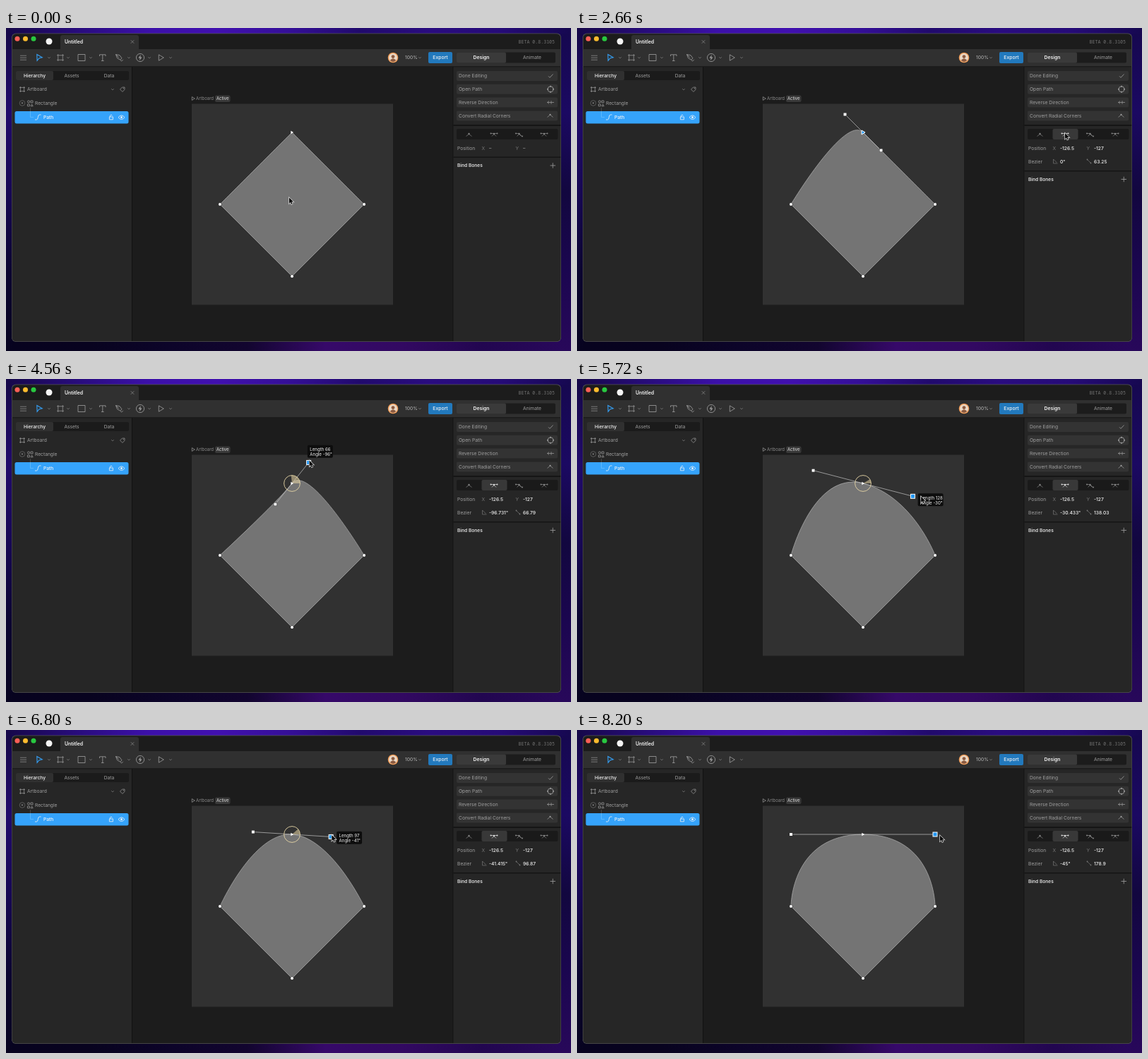
An HTML page with a canvas for the animation above (8220 ms loop, 800 by 458 pixels).

```html
<!DOCTYPE html>
<html lang="en">
<head>
<meta charset="utf-8">
<title>Vertex handle editing</title>
<style>
html, body { margin: 0; width: 100%; height: 100%; overflow: hidden; background: #10063a; }
canvas { display: block; width: 800px; height: 458px; }
</style>
</head>
<body>
<canvas id="stage" width="800" height="458"></canvas>
<script>
const ctx = document.getElementById('stage').getContext('2d');
const LOOP = 8220;
const BLUE = '#35a3fb', GREY = '#a0a0a0', DIM = '#777', WHITE = '#f4f4f4';
const UNIT = 0.5702; // stage pixels per artboard unit
const TOP = [405, 148], RIGHT = [507, 250], BOTTOM = [405, 352], LEFT = [303, 250];
const SELECT = 1480, MIRROR = 2660, HINT_ON = 3200, GRAB = 3980, DRAG = 4140, DROP = 7500;

// time, angle in degrees, length in units
const handleKeys = [
  [DRAG, 0, 63.25], [4560, -96.4, 66.4], [4586, -96.731, 66.79], [4840, -96.731, 66.79],
  [5280, -30.433, 64], [5500, -30.433, 64], [5900, -30.433, 174], [6320, -40, 90],
  [6460, -40.5, 92], [6660, -40.5, 92], [6800, -41.415, 96.87], [6830, -41.415, 96.87],
  [7480, -45, 178.9]
];
// time, x, y
const cursorKeys = [
  [460, 401, 240.5], [1160, 405, 147], [1660, 405, 147], [2300, 691, 149], [3060, 691, 149],
  [3780, 427, 176], [3880, 431.5, 171]
];
const leaveKeys = [[7760, 508, 145.5], [8200, 514, 149.5]];

function track(keys, t) {
  if (t <= keys[0][0]) return keys[0].slice(1);
  const i = keys.findIndex(k => k[0] > t);
  if (i < 0) return keys[keys.length - 1].slice(1);
  const a = keys[i - 1], b = keys[i];
  const p = (t - a[0]) / (b[0] - a[0]), s = p * p * (3 - 2 * p);
  return a.slice(1).map((v, n) => v + (b[n + 1] - v) * s);
}

function handleOffset([angle, length]) {
  const a = (angle + 45) * Math.PI / 180;
  return [Math.cos(a) * length * UNIT, Math.sin(a) * length * UNIT];
}

function cursorAt(t) {
  if (t < DRAG - 50) return track(cursorKeys, t);
  if (t > DROP) return track(leaveKeys, t);
  const [dx, dy] = handleOffset(track(handleKeys, t + 50));
  return [TOP[0] + dx + 1, TOP[1] + dy - 2.5];
}

function box(x, y, w, h, color, r = 0) {
  ctx.fillStyle = color;
  ctx.beginPath();
  ctx.roundRect(x, y, w, h, r);
  ctx.fill();
}
function dot(x, y, r, color) {
  ctx.fillStyle = color;
  ctx.beginPath();
  ctx.arc(x, y, r, 0, 7);
  ctx.fill();
}
function line(d, color = GREY, width = 0.8) {
  ctx.strokeStyle = color;
  ctx.lineWidth = width;
  ctx.stroke(new Path2D(d));
}
function fill(d, color) {
  ctx.fillStyle = color;
  ctx.fill(new Path2D(d));
}
function ring(x, y, r, color = GREY, width = 0.8) {
  ctx.strokeStyle = color;
  ctx.lineWidth = width;
  ctx.beginPath();
  ctx.arc(x, y, r, 0, 7);
  ctx.stroke();
}
function text(s, x, y, color = GREY, size = 6.7, weight = 400, align = 'left', family = 'Inter, sans-serif') {
  ctx.font = `${weight} ${size}px ${family}`;
  ctx.textAlign = align;
  ctx.fillStyle = color;
  ctx.fillText(s, x, y + size * 0.36);
}
const chevron = (x, y) => line(`M${x - 1.8} ${y - 0.8}l1.8 1.7 1.8 -1.7`, '#858585', 0.7);
function strip(x, y, w, h, vertical, colors) {
  const g = ctx.createLinearGradient(x, y, vertical ? x : x + w, vertical ? y + h : y);
  colors.forEach((c, i) => g.addColorStop(i / (colors.length - 1), c));
  box(x, y, w, h, g);
}
function frameIcon(x, y, r, color = GREY) {
  line(`M${x - r} ${y - r * 0.65}h${2 * r}M${x - r} ${y + r * 0.65}h${2 * r}M${x - r * 0.65} ${y - r}v${2 * r}M${x + r * 0.65} ${y - r}v${2 * r}`, color, 0.7);
}

function drawWindow() {
  strip(0, 0, 800, 229, false, ['#160849', '#280c7c', '#3c10a9', '#4110af', '#350f98', '#210a6d', '#2a0c80', '#260b78', '#160850']);
  strip(0, 8, 9, 450, true, ['#160849', '#210b6b', '#170854', '#0b0530', '#07031f']);
  strip(785, 8, 15, 450, true, ['#160850', '#1b0962', '#12073f', '#1b0650', '#28085a']);
  strip(9, 440, 776, 18, false, ['#07031f', '#08031f', '#0c0429', '#12052f', '#360969', '#320961', '#220650', '#28085a']);
  box(8, 7.5, 778, 437.5, '#525252', 6);
  box(8.8, 8.3, 776.4, 435.9, '#1c1c1c', 5.4);

  dot(16, 15.2, 3.5, '#ff5f57');
  dot(27.5, 15.2, 3.5, '#febc2e');
  dot(39, 15.2, 3.5, '#28c840');
  dot(61, 19, 4.5, WHITE);
  box(77, 10, 111, 21, '#303030', [3, 3, 0, 0]);
  text('Untitled', 83, 19.5, WHITE, 6.9, 600);
  line('M176.7 17.2l4.6 4.6m0 -4.6l-4.6 4.6', '#8c8c8c', 0.7);
  text('BETA 0.8.3105', 777, 19.5, '#707070', 6.6, 400, 'right', '"Noto Sans Mono", monospace');

  box(8.8, 30, 776.4, 24, '#303030');
  line('M20 39.2h9M20 42.2h9M20 45.2h9', '#8b8b8b');
  line('M43.8 37.5l7.4 4.3 -4.2 .9 -2.9 3.6z', BLUE, 1.1);
  frameIcon(77, 42, 5);
  line('M102 37.5h10v9h-10z');
  line('M132.5 40v-2.2h8.5v2.2M136.8 38v8.5M135 46.5h3.6');
  line('M155.5 37.5l2 5.2 4.3 2.4 2.2 -2.2 -3 -4.2zM155.5 37.5l4.5 4.7M161.8 45.4l1.8 1.6 2.2 -2.2');
  ring(190, 42, 5.6);
  fill('M191 38l-3.6 4.6h2.3l-.8 3.5 3.7 -4.7h-2.4z', GREY);
  line('M216.3 37.8l7 4.2 -7 4.2z');
  [61, 88, 120, 174, 203, 233, 586].forEach(x => chevron(x, 42));
  dot(548, 42, 7.3, '#f09a54');
  dot(548, 42, 6, '#e9d8c6');
  dot(548, 40.6, 2.4, '#8b5a40');
  fill('M543.7 45.7q4.3 -5 8.6 0q-4.3 4.4 -8.6 0z', '#8b5a40');
  text('100%', 565, 42, '#b5b5b5');
  box(598, 34, 34, 16, '#2279bd', 2);
  text('Export', 615, 42, WHITE, 6.8, 500, 'center');
  box(638, 34.5, 140, 15, '#1c1c1c', 2);
  box(638, 34.5, 70, 15, '#3a3a3a', 2);
  text('Design', 673, 42, WHITE, 6.8, 600, 'center');
  text('Animate', 745, 42, GREY, 6.7, 400, 'center');
}

function drawHierarchy() {
  box(8.8, 55.5, 169.2, 388.5, '#262626', [0, 0, 0, 5]);
  box(178, 55, 1, 389, '#111');
  box(14, 61, 160, 13, '#1b1b1b', 2);
  box(14, 61, 53, 13, '#303030', 2);
  text('Hierarchy', 40.5, 67.5, WHITE, 6.7, 500, 'center');
  text('Assets', 93, 67.5, GREY, 6.7, 400, 'center');
  text('Data', 146, 67.5, GREY, 6.7, 400, 'center');

  frameIcon(23, 87, 4);
  text('Artboard', 30, 87);
  chevron(151, 87);
  line('M161.5 87l3 -3h3.5v3.4l-3.2 3z', GREY, 0.7);
  dot(166.3, 85.6, 0.6, GREY);
  ring(23, 106.5, 3.8, '#6d6d6d', 0.7);
  fill('M21.5 105.8h3l-1.5 1.8z', GREY);
  ring(32, 104.5, 1.6, GREY, 0.7);
  line('M35 103h3v3h-3zM30.4 108h3v2.8h-3zM35 110.8l1.6 -2.8 1.6 2.8z', GREY, 0.7);
  text('Rectangle', 41, 106.5);
  box(12.5, 118, 161, 17.5, BLUE, 2.5);
  line('M34.5 113v5', '#555', 0.7);
  line('M34.5 118v8.5h4.5', '#6cc0ff', 0.7);
  line('M41 130h2.3q1.6 0 2 -3.5t2.1 -3.5h2.2', WHITE, 0.8);
  text('Path', 53, 126.7, WHITE, 6.7, 500);
  line('M146.4 126h5v3.8h-5zM147.4 126v-1.8q1.5 -2.3 3 0', WHITE, 0.8);
  line('M159 126.7q4.5 -5.6 9 0q-4.5 5.6 -9 0z', WHITE, 0.8);
  dot(163.5, 126.7, 1.4, WHITE);
}

function drawInspector(t) {
  const selected = t >= SELECT, mirrored = t >= MIRROR;
  box(632.5, 55, 1, 389, '#111');
  box(633.5, 55.5, 151.7, 388.5, '#262626', [0, 0, 5, 0]);
  ['Done Editing', 'Open Path', 'Reverse Direction', 'Convert Radial Corners'].forEach((label, i) => {
    const y = 68 + i * 18.8;
    box(638, y - 7, 143, 14, '#333', 2);
    text(label, 641, y);
  });
  line('M768 68.3l2 2 4.5 -4.8');
  ring(771, 86.8, 4, GREY, 0.8);
  [[771, 82.8], [775, 86.8], [771, 90.8], [767, 86.8]].forEach(([x, y]) => dot(x, y, 1, GREY));
  line('M766 105.5h10M769 103.5l-2.2 2 2.2 2M772 103.2v4.6', GREY, 0.7);
  line('M766.5 126.5l4 -3.5 4 3.5', GREY, 0.7);
  dot(770.5, 122.8, 1.1, GREY);

  box(633.5, 137, 151.7, 2, '#151515');
  box(638, 143, 143.5, 15, '#1a1a1a', 2);
  if (selected) box(mirrored ? 673.5 : 638, 143, 36, 15, '#383838', 2);
  const active = mirrored ? 1 : selected ? 0 : -1;
  [655.5, 691, 726.5, 762].forEach((x, i) => {
    const c = i === active ? '#ddd' : '#858585';
    if (i === 0) line(`M${x - 4} 153.5l4 -3 4 3`, c, 0.7);
    else {
      line(`M${x - 5} 149.5h${i === 2 ? 5 : 10}${i === 2 ? 'l4 4' : ''}M${x - 3} 153.5l3 -3 3 3`, c, 0.7);
      dot(x - 4.5, 149.5, 1, c);
      dot(x + 4.5, i === 2 ? 153.5 : 149.5, 1, c);
    }
    dot(x, 150, 1.2, c);
  });
  text('Position', 639, 170.5);
  text('X', 673.5, 170.5, DIM);
  text('Y', 721.5, 170.5, DIM);
  text(selected ? '-126.5' : '–', 684, 170.5, selected ? WHITE : GREY, 6.7, 500);
  text(selected ? '-127' : '–', 732, 170.5, selected ? WHITE : GREY, 6.7, 500);

  if (mirrored) {
    const [angle, length] = track(handleKeys, t + 26);
    text('Bezier', 639, 189.3);
    line('M674.5 186v6h6M674.5 186l5 5', DIM, 0.7);
    text(+angle.toFixed(3) + '°', 684, 189.3, WHITE, 6.7, 500);
    line('M722.5 186.5l5 5', DIM, 0.7);
    dot(722.5, 186.5, 0.9, DIM);
    dot(727.5, 191.5, 0.9, DIM);
    text(+length.toFixed(2), 732, 189.3, WHITE, 6.7, 500);
  } else if (selected) {
    text('Corner', 639, 189.3);
    line('M674.5 192v-3q0 -3 3 -3h3', DIM, 0.7);
    text('0', 684, 189.3, WHITE, 6.7, 500);
  }
  const end = selected ? 202 : 182.5;
  box(633.5, end, 151.7, 1.6, '#151515');
  text('Bind Bones', 639, end + 12.5, '#e0e0e0', 6.6, 600);
  line(`M770.5 ${end + 12.5}h7.5M774.25 ${end + 8.75}v7.5`);

  if (t >= HINT_ON && t < GRAB) {
    box(638.5, 118, 33.5, 17.5, '#0d0d0d', 2);
    text('Straight', 655.2, 126.7, WHITE, 6.5, 400, 'center');
  }
}

function square(x, y, selected) {
  const s = selected ? 7 : 5;
  box(x - s / 2, y - s / 2, s, s, selected ? '#fff' : '#2a2a2a');
  if (selected) box(x - 2.5, y - 2.5, 5, 5, '#2196f3');
  else box(x - 2, y - 2, 4, 4, '#fff');
}

function drawArtboard(t) {
  line('M263.3 97.6l4 2.4 -4 2.4z', GREY, 0.7);
  text('Artboard', 269, 100, '#8a8a8a', 6);
  box(296, 95.5, 21.5, 9.5, '#383838', 2);
  text('Active', 306.7, 100.2, '#e0e0e0', 5.9, 400, 'center');
  box(263, 107.5, 285, 285, '#313131');

  const pose = track(handleKeys, t);
  const mirrored = t >= MIRROR, dragging = t >= DRAG && t < DROP;
  const [dx, dy] = mirrored ? handleOffset(pose) : [0, 0];
  const [x, y] = TOP, out = [x + dx, y + dy], into = [x - dx, y - dy];
  const outline = `M${LEFT}C${LEFT} ${into} ${TOP}C${out} ${RIGHT} ${RIGHT}L${BOTTOM}Z`;
  fill(outline, '#747474');
  line(outline, '#b4b4b4', 0.7);

  if (mirrored) line(`M${into}L${out}`, '#c4c4c4', 0.7);
  [RIGHT, BOTTOM, LEFT].forEach(p => {
    dot(...p, 2.6, '#3a3a3a');
    dot(...p, 2, '#fff');
  });
  if (dragging) {
    ctx.beginPath();
    ctx.moveTo(x, y);
    ctx.arc(x, y, 11.3, 0, pose[0] * Math.PI / 180, true);
    ctx.fillStyle = 'rgba(232,213,164,.55)';
    ctx.fill();
    ring(x, y, 11.4, '#e6d5a5', 0.9);
  }
  if (t >= SELECT && t < GRAB) {
    const arrow = `M${x - 2} ${y - 3}l5 3 -5 3z`;
    fill(arrow, '#2196f3');
    line(arrow, '#fff', 1);
  } else {
    fill(`M${x - 1.7} ${y - 2.2}l3.8 2.2 -3.8 2.2z`, '#fff');
  }
  if (!mirrored) return;
  square(...into, false);
  square(...out, t >= GRAB);
  if (dragging) {
    const reach = Math.hypot(dx, dy);
    const cx = out[0] + 26 * dx / reach, cy = out[1] + 20 * dy / reach;
    box(cx - 18, cy - 9, 36, 18, '#0d0d0d', 2);
    text('Length ' + Math.round(pose[1]), cx - 14.5, cy - 3, WHITE, 6.1);
    text(`Angle ${Math.trunc(pose[0]) || 0}°`, cx - 14.5, cy + 4, WHITE, 6.1);
  }
}

function drawCursor([x, y]) {
  const arrow = `M${x} ${y}v8.4l1.9 -1.8 1.3 3 1.4 -.6 -1.3 -2.9h2.7z`;
  line(arrow, '#e8e8e8', 1.3);
  fill(arrow, '#0a0a0a');
}

function draw(now) {
  const t = now % LOOP;
  drawWindow();
  drawHierarchy();
  drawArtboard(t);
  drawInspector(t);
  drawCursor(cursorAt(t));
  requestAnimationFrame(draw);
}
requestAnimationFrame(draw);
</script>
</body>
</html>
```
